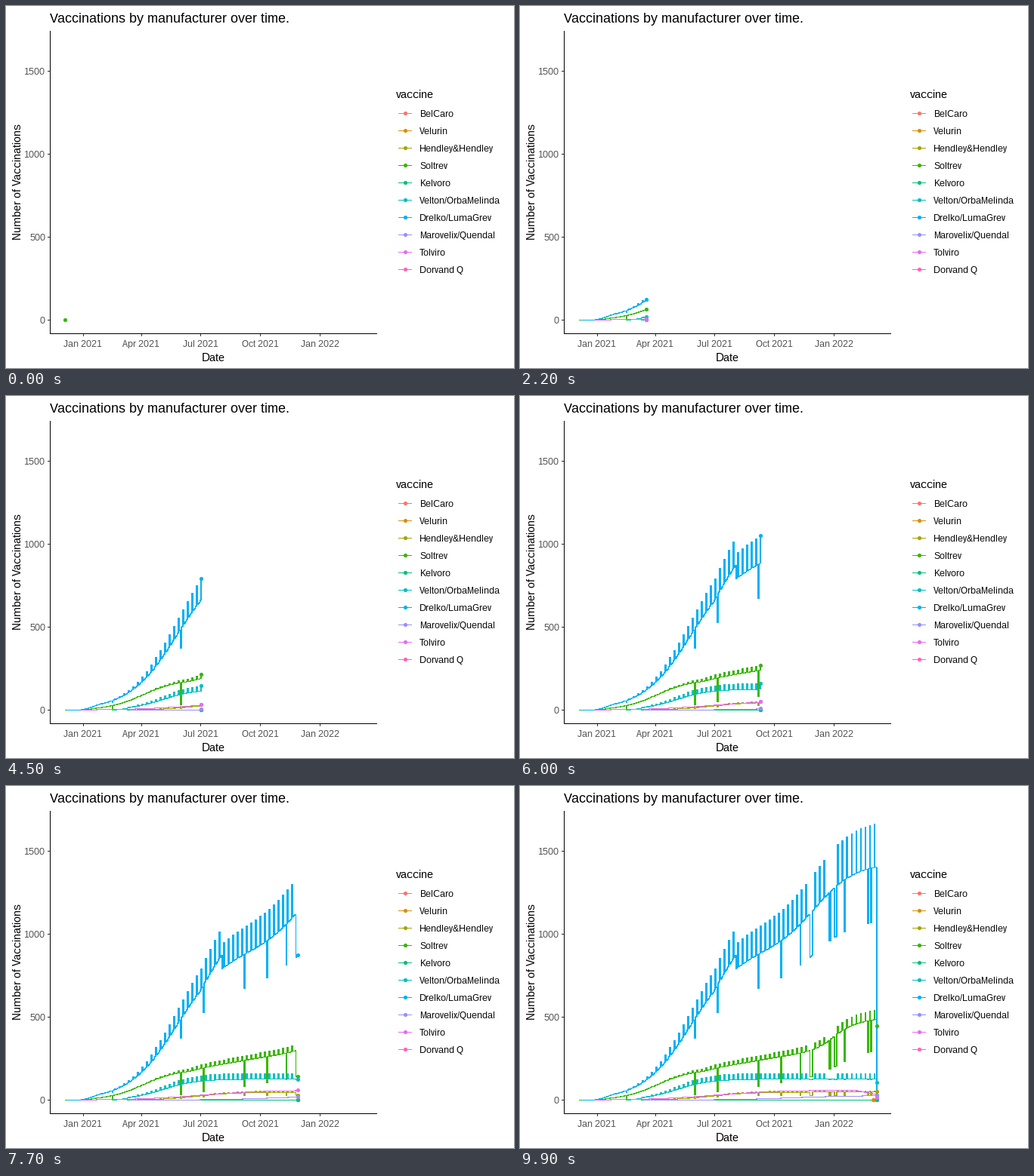
A matplotlib script that plays this animation: 672x480 px, repeating every 10000 ms.

```python
import numpy as np
import matplotlib.pyplot as plt
from matplotlib.animation import FuncAnimation
from matplotlib.patches import Circle

W, H, DPI = 672, 480, 100
FRAMES, LAST = 100, 459
PX = 72 / DPI  # points per pixel

plt.rcParams.update({"font.family": "Liberation Sans",
                     "text.hinting": "native", "text.hinting_factor": 1})

LABELS = ["BelCaro", "Velurin", "Hendley&Hendley", "Soltrev", "Kelvoro",
          "Velton/OrbaMelinda", "Drelko/LumaGrev", "Marovelix/Quendal",
          "Tolviro", "Dorvand Q"]
COLORS = ["#F8766D", "#D89000", "#A3A500", "#39B600", "#00BF7D",
          "#00BFC4", "#00B0F6", "#9590FF", "#E76BF3", "#FF62BC"]
ORDER = [0, 1, 2, 3, 9, 4, 5, 6, 7, 8]

days = np.arange(LAST + 1)

# Days with missing reports, and the year-end break without weekly catch-up
gap = np.isin(days, [73, 178, 213, 276, 311, 341, 356, 357, 358, 359,
                     386, 387, 394, 395, 396, 409, 445, 450])
catch_up = (days % 7 == 0) & ~gap & ((days < 380) | (days > 396))


def wave(size, mid, width):
    return size / (1 + np.exp((mid - days) / width))


def ramp(start, length):
    return np.clip((days - start) / length, 0, 1)


def reported(base, spike, kept, final):
    """Weekly catch-up peaks, dips on gap days and a partial last day."""
    values = base * np.where(catch_up, 1 + spike, np.where(gap, kept, 1))
    values[-1] *= final
    return values


backlog = np.where((days > 209) & (days < 242), 2.6 * (days - 209), 0)
blue = reported(
    wave(900, 172, 37) * ramp(20, 30) + wave(530, 364, 31) + backlog,
    0.185 * ramp(40, 100), 0.765, 0.02)
green = reported(
    wave(185, 120, 27) * ramp(10, 40) + 0.63 * np.maximum(days - 190, 0)
    + wave(135, 392, 14),
    0.115 * ramp(100, 120), (days - 45) / 670, 0.91)
cyan = reported(wave(126, 150, 26) * ramp(70, 30), 0.28, 0.97, 0.82)
olive = reported(wave(48, 205, 30), 0.15, 0.6, 1)
lilac = wave(28, 330, 50)
violet = reported(wave(60, 210, 50) * (1 - 0.45 * ramp(425, 34)), 0, 1, 0.45)
zero = np.zeros(LAST + 1)

# values, first day, last day
SERIES = [(zero, 150, 454), (zero, 150, 453), (olive, 105, LAST),
          (green, 0, LAST), (zero, 95, LAST), (cyan, 75, LAST),
          (blue, 4, LAST), (lilac, 100, LAST), (violet, 25, LAST),
          (zero, 100, LAST)]

fig = plt.figure(figsize=(W / DPI, H / DPI), dpi=DPI, facecolor="white")
ax = fig.add_axes([0, 0, 1, 1])
ax.set_xlim(0, W)
ax.set_ylim(H, 0)
ax.axis("off")


def day_x(d):
    return np.floor(78.5 + 0.858 * d) + 0.5


def value_y(v):
    return np.floor(416.5 - 0.22 * v) + 0.5


def text(x, y, s, size, color="black", **kw):
    ax.text(x, y, s, fontsize=size * PX, color=color, **kw)


def rule(xs, ys, color="black", **kw):
    return ax.plot(xs, ys, color=color, lw=PX, antialiased=False, snap=False,
                   solid_capstyle="butt", solid_joinstyle="bevel", **kw)[0]


def dot(x, y, color, **kw):
    return ax.add_patch(Circle((x, y), 2.6, fc=color, lw=0, **kw))


# Axes
rule([58.5, 58.5], [33, 435])
rule([58, 491], [434.5, 434.5])
for v in range(0, 2000, 500):
    y = value_y(v)
    rule([55, 58], [y, y], "#333333")
    text(52, y + 4.5, str(v), 12, "#4D4D4D", ha="right")
for d, name in [(28, "Jan 2021"), (118, "Apr 2021"), (209, "Jul 2021"),
                (301, "Oct 2021"), (393, "Jan 2022")]:
    x = day_x(d)
    rule([x, x], [435, 438], "#333333")
    text(x - 0.5, 452, name, 12, "#4D4D4D", ha="center")
text(58, 22, "Vaccinations by manufacturer over time.", 18)
text(274.5, 471, "Date", 15, ha="center")
text(20, 233, "Number of Vaccinations", 15, rotation=90,
     rotation_mode="anchor", ha="center", va="baseline")

# Legend
text(516, 122, "vaccine", 15)
for i, (label, color) in enumerate(zip(LABELS, COLORS)):
    y = 142.5 + 23 * i
    rule([519, 537], [y, y], color)
    dot(528.5, y, color)
    text(547, y + 4.5, label, 12)

lines = {k: rule([], [], COLORS[k], zorder=3) for k in ORDER}
dots = {k: dot(0, 0, COLORS[k], zorder=4) for k in ORDER}


def draw(i):
    today = min(int((i + 0.5) * LAST / (FRAMES - 1)), LAST) if i else 0
    for k in ORDER:
        values, first, last = SERIES[k]
        end = min(today, last)
        shown = slice(first, end + 1)
        lines[k].set_data(day_x(days[shown]), value_y(values[shown]))
        dots[k].set_visible(end >= first)
        dots[k].center = day_x(end), value_y(values[end])
    return [*lines.values(), *dots.values()]


anim = FuncAnimation(fig, draw, frames=FRAMES, interval=100, repeat=True,
                     repeat_delay=0, blit=False)
plt.show()
```
